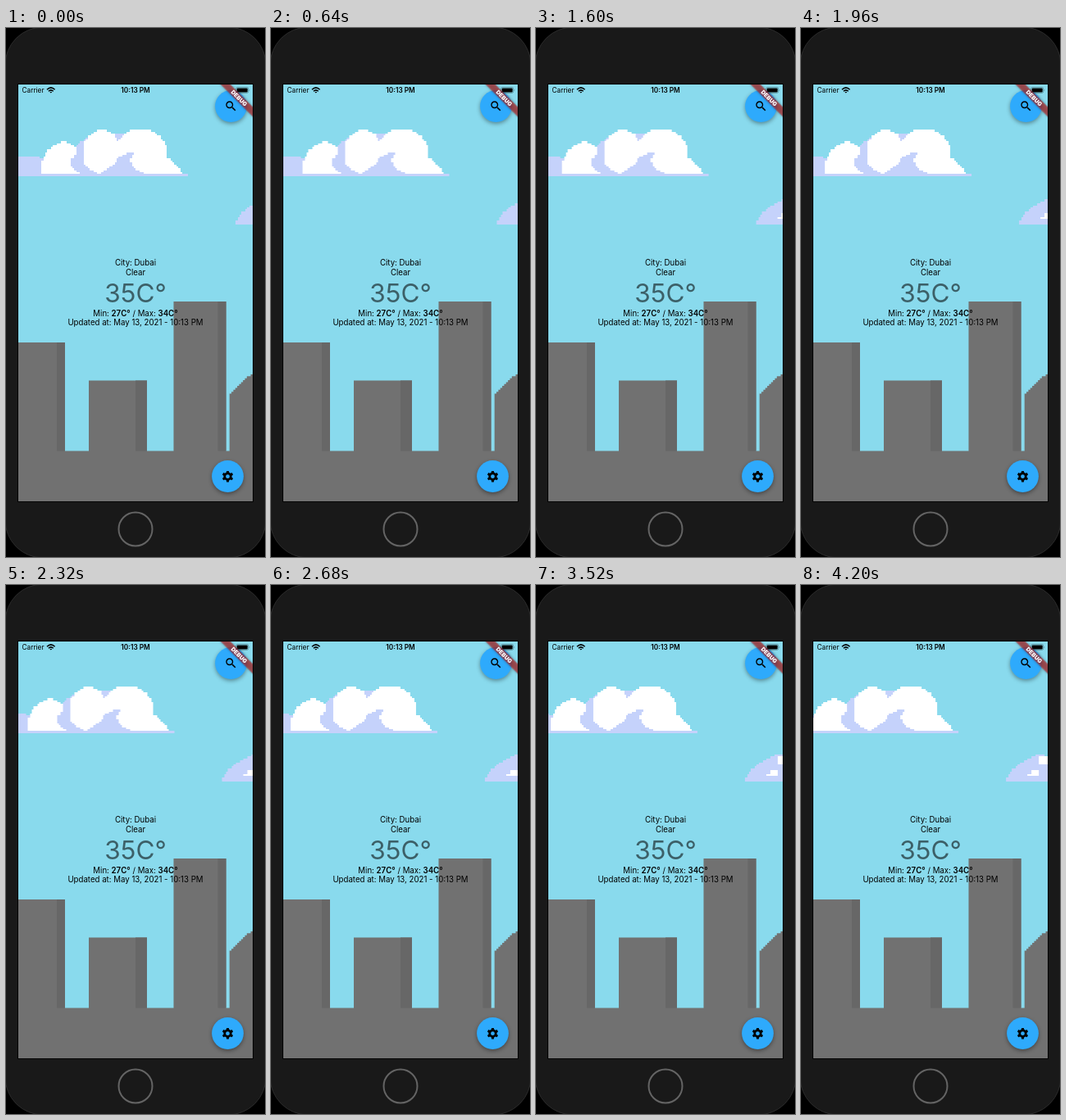
Write an HTML page that moves like this. It is 316x646 px and loops after 4240 ms.

```html
<!DOCTYPE html>
<html lang="en">
<head>
<meta charset="utf-8">
<title>Weather</title>
<style>
  html, body { margin: 0; width: 100%; height: 100%; overflow: hidden; background: #000; }
  svg { display: block; width: 316px; height: 646px; }
  text { font-family: Inter, Roboto, sans-serif; fill: #000; }
  .info { font-size: 9.66px; text-anchor: middle; fill: rgba(0, 0, 0, .87); }
  .info .big { font-size: 31.5px; fill: rgba(0, 0, 0, .56); }
  .info tspan { font-weight: 600; }
  .status { font-size: 8.28px; }
  .fab { fill: #2eaafc; filter: drop-shadow(0 2.5px 2.5px rgba(0, 0, 0, .38)); }
  .ribbon { filter: drop-shadow(0 0 2px rgba(0, 0, 0, .5)); }
</style>
</head>
<body>
<svg viewBox="0 0 316 646">
  <defs>
    <clipPath id="screen"><rect x="15" y="69" width="286" height="509"/></clipPath>
  </defs>

  <rect x="-1" y="-1" width="318" height="648" rx="46" fill="#191919" stroke="#2b2b2b"/>
  <rect x="14" y="68" width="288" height="511" fill="#050505"/>
  <circle cx="158" cy="612" r="20.5" fill="#191919" stroke="#646464" stroke-width="2"/>

  <g clip-path="url(#screen)">
    <rect x="15" y="69" width="286" height="509" fill="#89daed"/>
    <g id="clouds" shape-rendering="crispEdges"></g>

    <g id="city" fill="#717171">
      <path d="M15 384H72V516.5H101V430.5H172V516.5H204.5V334H268.5V516.5H301V578H15Z"/>
      <path fill="#676767" d="M62 384H72V516.5H62ZM158 430.5H172V516.5H158ZM258.5 334H268.5V516.5H258.5Z"/>
    </g>

    <g class="info">
      <text x="158" y="290.4">City: Dubai</text>
      <text x="158" y="302.2">Clear</text>
      <text class="big" x="158" y="335">35C°</text>
      <text x="158" y="351.6">Min: <tspan>27C°</tspan> / Max: <tspan>34C°</tspan></text>
      <text x="158" y="363.4">Updated at: May 13, 2021 - 10:13 PM</text>
    </g>

    <circle class="fab" cx="274.5" cy="95.5" r="19.4"/>
    <path transform="translate(266.2 87.2) scale(.69)" d="M15.5 14h-.79l-.28-.27C15.41 12.59 16 11.11 16 9.5 16 5.91 13.09 3 9.5 3S3 5.91 3 9.5 5.91 16 9.5 16c1.61 0 3.09-.59 4.23-1.57l.27.28v.79l5 4.99L20.49 19l-4.99-5zm-6 0C7.01 14 5 11.99 5 9.5S7.01 5 9.5 5 14 7.01 14 9.5 11.99 14 9.5 14z"/>

    <circle class="fab" cx="270.5" cy="547.5" r="19.4"/>
    <g transform="translate(270.5 547.7)">
      <circle r="3.75" fill="none" stroke="#000" stroke-width="2.7"/>
      <g id="teeth"></g>
    </g>

    <g class="status">
      <text x="19.5" y="79.3">Carrier</text>
      <text x="158" y="79.3" text-anchor="middle" font-weight="600">10:13 PM</text>
      <g fill="none" stroke="#000" stroke-width="1.5">
        <path d="M50 75.2Q54.8 70.6 59.6 75.2M51.9 77.2Q54.8 74.6 57.7 77.2"/>
        <path d="M54.8 79.6L53.4 78.2Q54.8 77.2 56.2 78.2Z" fill="#000" stroke="none"/>
      </g>
      <rect x="280.7" y="72.4" width="15" height="7" rx="1.8" fill="none" stroke="#000" stroke-opacity=".4" stroke-width=".7"/>
      <rect x="281.7" y="73.4" width="13" height="5" rx="1"/>
      <path d="M296.6 74.7q1.3 1.2 0 2.4Z" fill-opacity=".5"/>
    </g>

    <g transform="translate(301 69) rotate(45) scale(.69)">
      <rect class="ribbon" x="-42" y="28" width="84" height="12" fill="#b71c1c" fill-opacity=".63"/>
      <text y="37.7" text-anchor="middle" font-size="10.2" font-weight="900" style="fill:#fff">DEBUG</text>
    </g>
  </g>
</svg>

<script>
  const LOOP = 4240, STEP = 40, DRIFT = 30.2, CELL = 2.35;
  const WHITE = '#fff', LILAC = '#c5d2fb';
  const byId = id => document.getElementById(id);
  const probe = document.createElement('canvas').getContext('2d');

  function addPath(parent, d, fill) {
    const el = document.createElementNS('http://www.w3.org/2000/svg', 'path');
    el.setAttribute('d', d);
    if (fill) el.setAttribute('fill', fill);
    parent.append(el);
    return el;
  }

  // Turns an outline into rows of square cells.
  function pixelate(outline, [left, top, right, bottom]) {
    const shape = new Path2D(outline);
    let d = '';
    for (let y = bottom - CELL; y > top - CELL; y -= CELL) {
      let start = null;
      for (let x = left; x <= right + CELL; x += CELL) {
        const inside = x <= right && probe.isPointInPath(shape, x + CELL / 2, y + CELL / 2);
        if (inside && start === null) start = x;
        if (!inside && start !== null) {
          d += `M${start.toFixed(2)} ${y.toFixed(2)}H${x.toFixed(2)}v${CELL}H${start.toFixed(2)}Z`;
          start = null;
        }
      }
    }
    return d;
  }

  const bigBox = [1, 122, 224, 180.6];
  const smallBox = [278, 204, 340, 240];
  const layers = [
    [LILAC, bigBox, 'M0 159L20 157H36L46 160V179H221V181H0Z'],
    [LILAC, bigBox, 'M70 178.3L79 162 83 150 88 142 94 137 100 133 108 130H150V178.3Z'],
    [WHITE, bigBox, 'M43 178.3V164L48 156 51 149 57 145 62 141 67 139H74L78 142 84 145 86 150 84 157 79 161 78 166 82 172 91 178.3Z'],
    [WHITE, bigBox, 'M94 163V144L97 137 102 131 108 127 113 124H121L127 127 133 131 137 139 141 133 146 128 154 124H173L180 127 187 131 192 137 195 143 196 158 201 161 207 167 211 172 217 178.3H114L106 175 99 170Z'],
    [LILAC, bigBox, 'M114 178.3L122 173 131 167 136 160 143 155 149 152H156L153 158 152 163 155 169 161 174 170 178.3Z'],
    [LILAC, smallBox, 'M278 241L283 232 288 225 293 222 298 217 303 214 309 212 315 208 319 206H324L328 210 334 213 340 220V241Z'],
    [WHITE, smallBox, 'M321 209H328L334 212 340 218H321Z'],
    [WHITE, smallBox, 'M311 227H320V233H306V230H311Z']
  ];

  const clouds = byId('clouds');
  for (const [fill, box, outline] of layers) addPath(clouds, pixelate(outline, box), fill);

  addPath(byId('city'), pixelate('M272.5 447L301 421H305V517H272.5Z', [272.7, 420, 303, 517]));

  for (let a = 0; a < 360; a += 60) {
    addPath(byId('teeth'), 'M-1.7 -4.4L-1.4 -6.8H1.4L1.7 -4.4Z').setAttribute('transform', `rotate(${a})`);
  }

  const drift = clouds.animate(
    [{ transform: 'translateX(0)' }, { transform: `translateX(${-DRIFT}px)` }],
    { duration: LOOP, iterations: Infinity, easing: `steps(${LOOP / STEP}, end)` }
  );
  drift.startTime = document.timeline.currentTime;
</script>
</body>
</html>
```
